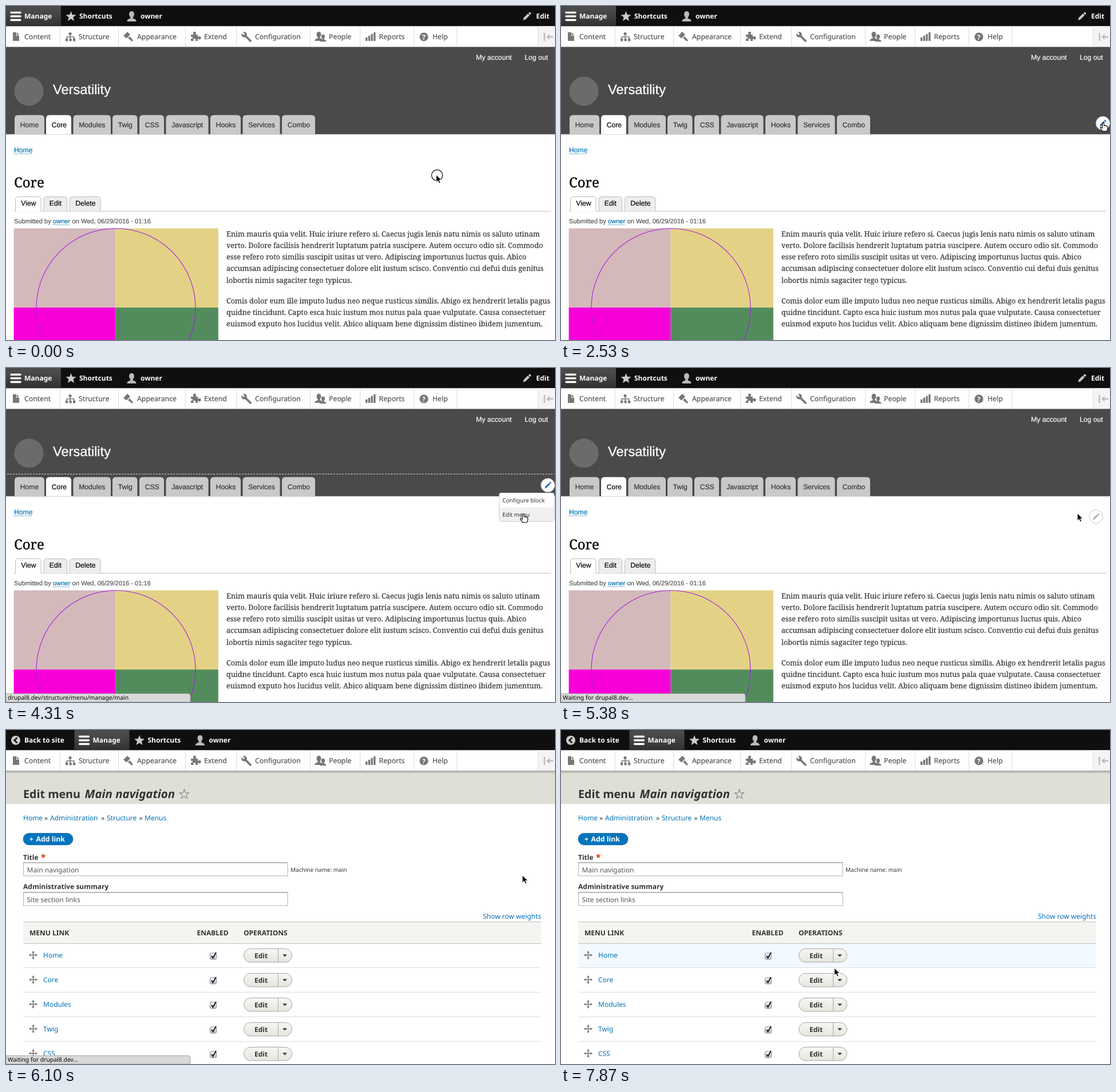
Recreate the animation shown at these times as an HTML page. Size 959 by 584 pixels, loop 7.99 s.

```html
<!DOCTYPE html>
<html lang="en">
<head>
<meta charset="utf-8">
<title>Editing a menu</title>
<style>
html, body { margin: 0; width: 100%; height: 100%; overflow: hidden; background: #fff; }
svg { display: block; width: 959px; height: 584px; }
text { font: 12px "Noto Sans", sans-serif; fill: #333; white-space: pre; text-rendering: geometricPrecision; }
.b { font-weight: bold; }
.w { fill: #fff; }
.tray { font-size: 12.3px; fill: #555; stroke: #555; stroke-width: .2px; }
.a { fill: #0071b8; font-weight: 500; }
.dim { fill: #777; font-weight: bold; }
.h, .hw, .by { font: 12.2px "Liberation Sans", Arial, sans-serif; stroke: #333; stroke-width: .2px; }
.hw { fill: #fff; stroke: #fff; }
.site { font: 23.6px "Liberation Sans", Arial, sans-serif; fill: #fff; stroke: #fff; stroke-width: .3px; }
.by { font-size: 11.1px; fill: #555; stroke: #555; }
.strong { fill: #000; stroke: #000; }
.link { fill: #0071b3; stroke: #0071b3; }
.title { font: 24px "Noto Serif", Georgia, serif; fill: #000; stroke: #000; stroke-width: .3px; }
.p { font: 12.65px "Noto Serif", Georgia, serif; fill: #3b3b3b; stroke: #3b3b3b; stroke-width: .25px; }
.big { font-size: 19.7px; font-weight: bold; }
.i { font-size: 20.4px; font-style: italic; }
.desc { font-size: 11.65px; fill: #555; }
.s { font-size: 10px; }
.st { font-size: 10.4px; fill: #000; }
</style>
</head>
<body>
<svg viewBox="0 0 959 584" xmlns="http://www.w3.org/2000/svg">
  <defs>
    <linearGradient id="manage" x2="0" y2="1"><stop offset=".2" stop-color="#4b4b4b"/><stop offset="1" stop-color="#303030"/></linearGradient>
    <linearGradient id="btn" x2="0" y2="1"><stop stop-color="#f6f6f3"/><stop offset="1" stop-color="#e6e6df"/></linearGradient>
    <linearGradient id="check" x2="0" y2="1"><stop stop-color="#fafafa"/><stop offset="1" stop-color="#b4c3d6"/></linearGradient>
    <linearGradient id="shade" x2="0" y2="1"><stop stop-opacity=".25"/><stop offset="1" stop-opacity="0"/></linearGradient>
  </defs>
</svg>
<script>
const svg = document.querySelector("svg");
const T = (x, y, s, c = "", more = "") => `<text x="${x}" y="${y}" class="${c}" ${more}>${s}</text>`;
const R = (x, y, w, h, fill, more = "") => `<rect x="${x}" y="${y}" width="${w}" height="${h}" fill="${fill}" ${more}/>`;
const P = (d, fill, more = "") => `<path d="${d}" fill="${fill}" ${more}/>`;
const C = (x, y, r, fill, more = "") => `<circle cx="${x}" cy="${y}" r="${r}" fill="${fill}" ${more}/>`;
const L = (d, stroke, w = 1, more = "") => P(d, "none", `stroke="${stroke}" stroke-width="${w}" ${more}`);
const G = (x, y, s, scale = 1) => `<g transform="translate(${x} ${y}) scale(${scale})">${s}</g>`;
const layer = (id, s) => `<g id="${id}">${s}</g>`;
const each = (list, f) => list.map(f).join("");

const star = (x, y, r, fill, more) => P("M" + Array.from({ length: 10 }, (_, i) => {
  const a = i * Math.PI / 5, d = i % 2 ? r * .42 : r;
  return (x + d * Math.sin(a)).toFixed(1) + " " + (y - d * Math.cos(a)).toFixed(1);
}).join("L") + "Z", fill, more);
const pencil = (x, y, k, fill) =>
  G(x, y, P("M-8 8-6.5 3 2-5.5 5.5-2-3 6.5ZM3-6.5 5-8.5Q6-9 7-8L8.2-6.8Q9-6 8.3-5L6.5-3Z", fill), k);
const person = (x, y, k, fill) =>
  G(x, y, P("M0-9C6-9 5 0 2.2 1.5V3.5C5 5 8 5 8 9H-8C-8 5-5 5-2.2 3.5V1.5C-5 0-6-9 0-9Z", fill), k);

function topBar(back, active) {
  const dx = back ? 119.5 : 0;
  return R(0, 0, 959, 35.5, "#0f0f0f") +
    (back ? C(17, 18, 8, "#ccc") + L("M19.5 13.5 14.5 18 19.5 22.5", "#111", 2.5) + T(32, 22, "Back to site", "b w") : "") +
    G(dx, 0, (active ? R(0, 0, 96, 35.5, "url(#manage)") : "") +
      L("M9 11.5H25M9 18H25M9 24.5H25", active ? "#fff" : "#ccc", 3.4, 'stroke-linecap="round"') +
      T(32, 22, "Manage", "b w") + star(113.5, 18.5, 9.5, "#ccc") + T(128, 22, "Shortcuts", "b w") +
      person(219.5, 18, 1, "#bbb") + T(235, 22, "owner", "b w"));
}

function tray() {
  const labels = [["Content", 32], ["Structure", 127], ["Appearance", 229], ["Extend", 346], ["Configuration", 435],
    ["People", 564], ["Reports", 651.5], ["Help", 745]];
  const g = "#777";
  const icons = P("M12 46H18V52H23V61H12ZM19 46 23 51H19Z", g) +
    L("M112 50V54M106 58V54H119V58M112 54V58", g, 1.4) + C(112, 48.5, 2.6, g) + each([106, 112.5, 119], x => R(x - 2, 57, 4.2, 4.5, g)) +
    P("M205 52 212 45 217 50 210 57ZM213 56 216 53 222 60 220 62Z", g) + L("M206 53 211 58", "#fff") +
    P("M323 50H328Q325 45 329.5 45T331 50H335V54Q341 51 340.5 56T335 57V61H331Q332 57 329 57T328 61H323V57Q327 57 326 55T323 54Z", g) +
    C(416, 50, 4.8, g) + L("M411 45 416 50", "#fff", 3) + L("M418 52 427 61", g, 3.8, 'stroke-linecap="round"') +
    person(554, 56, .7, g) + person(546.5, 53, .9, g) +
    each([[628, 6], [632.7, 9], [637.4, 12], [642.1, 15]], ([x, h]) => R(x, 61 - h, 3.4, h, g)) +
    C(730, 54, 7.6, g) + T(726.9, 58.5, "?", "b w");
  return R(0, 35.5, 959, 36, "#fff") + R(929, 35.5, 30, 36, "#f4f4f4") +
    L("M94.5 36V71M196.5 36V71M313.5 36V71M402.5 36V71M531.5 36V71M618.5 36V71M712.5 36V71M787.5 36V71M929.5 36V71", "#ddd") +
    L("M0 71.5H959", "#aaa") + icons + each(labels, ([s, x]) => T(x, 57.5, s, "tray")) +
    L("M940.5 47V61M946 54H956", "#bbb", 2.4) + P("M944 54 949.5 49V59Z", "#bbb");
}

function frontPage() {
  const tabs = [["Home", 15, 52], ["Core", 70, 44], ["Modules", 117.5, 65.5], ["Twig", 186, 43.5], ["CSS", 233, 43],
    ["Javascript", 279.5, 74], ["Hooks", 357, 53], ["Services", 413.5, 65], ["Combo", 482, 58]];
  const top = (x, y, w, h, r) => `M${x} ${y + h}V${y + r}Q${x} ${y} ${x + r} ${y}H${x + w - r}Q${x + w} ${y} ${x + w} ${y + r}V${y + h}`;
  const views = [["View", 16.5, 44.5, "#fff"], ["Edit", 66, 40.5, "#ededed"], ["Delete", 111.5, 53.5, "#ededed"]];
  const lines = [
    "Enim mauris quia velit. Huic iriure refero si. Caecus jugis lenis natu nimis os saluto utinam",
    "verto. Dolore facilisis hendrerit luptatum patria suscipere. Autem occuro odio sit. Commodo",
    "esse refero roto similis suscipit usitas ut vero. Adipiscing importunus luctus quis. Abico",
    "accumsan adipiscing consectetuer dolore elit iustum scisco. Conventio cui defui duis genitus",
    "lobortis nimis sagaciter tego typicus.",
    "Comis dolor eum ille imputo ludus neo neque rusticus similis. Abigo ex hendrerit letalis pagus",
    "quidne tincidunt. Capto esca huic iustum mos nutus pala quae vulputate. Causa consectetuer",
    "euismod exputo hos lucidus velit. Abico aliquam bene dignissim distineo ibidem jumentum."];
  return R(0, 71, 959, 153.3, "#4a4a4a") + topBar(false, true) + tray() +
    pencil(910, 18, .85, "#ccc") + T(926, 22, "Edit", "b w") +
    T(821, 94, "My account", "hw") + T(906, 94, "Log out", "hw") +
    C(40, 149, 25.5, "#6b6b6b") + T(82, 154, "Versatility", "site") +
    each(tabs, ([s, x, w], i) => P(top(x, 190.8, w, 33.5, 6), i == 1 ? "#fff" : "#c9c9c9") +
      T(x + 9.7, 212, s, i == 1 ? "h strong" : "h")) +
    T(14, 256, "Home", "h link") + L("M14 258.5H46", "#0071b3", 1, 'stroke-dasharray="1"') +
    T(14, 316.5, "Core", "title") + L("M14 359H952", "#bbb") +
    each(views, ([s, x, w, f]) => P(top(x, 333.5, w, 25.5, 5), f, 'stroke="#bbb"') + T(x + 9.8, 349, s, "h strong")) +
    L("M17 359H60.5", "#fff", 1.5) +
    T(14, 380, "Submitted by", "by") + T(82, 380, "owner", "by link") + L("M82 382.5H112", "#0071b3", 1, 'stroke-dasharray="1"') +
    T(115.5, 380, "on Wed, 06/29/2016 - 01:16", "by") +
    R(13.6, 388.8, 178, 139, "#d4b9bb") + R(191.6, 388.8, 179.2, 139, "#e3d286") +
    R(13.6, 527.3, 178, 57, "#f800d8") + R(191.6, 527.3, 179.2, 57, "#528c5c") +
    C(192, 528, 139, "none", 'stroke="#a020e0" stroke-width="1.1"') +
    each(lines, (s, i) => T(385, 403 + i * 20.15 + (i > 4 ? 16 : 0), s, "p"));
}

const checkbox = (x, y) => R(x - 5.5, y - 5, 11, 11, "url(#check)", 'stroke="#888" rx="2"') + L(`M${x - 3} ${y}L${x - .5} ${y + 3.5} ${x + 5} ${y - 6}`, "#111", 1.9);
const input = (y, s, off) => R(30.5, y, 461.5, 23, off ? "#ededed" : "#fff", `stroke="${off ? "#ccc" : "#b0b0aa"}"`) +
  (off ? "" : L(`M30 ${y}H492`, "#999")) + T(36.5, y + 16.5, s, "", 'style="fill:#555"');
const required = (x, y) => T(x, y, "*", "b", 'style="fill:#e32700;font-size:15px"');

function adminHead(dy) {
  return G(0, dy, R(0, 35, 959, 58, "#e0dfd7") + R(0, 35, 959, 5, "url(#shade)") +
    T(30, 82, "Edit menu", "big") + T(137.5, 82, "Main navigation", "big i") +
    star(311.5, 76, 8.5, "none", 'stroke="#888" stroke-width="1.2"') +
    each([["Home", 30], ["Administration", 77], ["Structure", 176], ["Menus", 242]], ([s, x]) => T(x, 121.5, s, "a")) +
    each([67, 166, 232.5], x => T(x, 121.5, "»")) +
    R(30, 144, 87, 20.5, "#0074bd", 'rx="10.2" stroke="#005a93" stroke-width=".6"') + T(41, 158.5, "+", "b w") +
    T(52.5, 158.5, "Add link", "b w", 'style="font-size:12.3px"') +
    T(30, 190, "Title", "b") + required(61, 191) + input(195.5, "Main navigation"));
}
const names = ["Home", "Core", "Modules", "Twig", "CSS"];
const tableHead = (y, cols) => R(30, y, 905, 38, "#f4f4f1") + L(`M30 ${y}H935M30 ${y + 38}H935`, "#bfbfba") +
  each(cols, ([s, x]) => T(x, y + 23.5, s, "b"));

function plainAdmin() {
  return R(0, 0, 959, 584, "#fff") + adminHead(0) + topBar(false, false) +
    T(30, 242, "Menu name", "dim") + required(104, 243) + input(247.5, "main", true) +
    T(30, 286.5, "A unique name to construct the URL for the menu. It must only contain lowercase letters, numbers and hyphens.", "desc") +
    T(30, 315, "Administrative summary", "b") + input(320.5, "Site section links") +
    tableHead(353.5, [["MENU LINK", 41], ["ENABLED", 290.5], ["WEIGHT", 372], ["OPERATIONS", 574]]) +
    each(names, (s, i) => G(0, i * 41, T(41, 416, s, "a") + checkbox(319, 412) +
      R(373, 401, 51.5, 21.5, "url(#btn)", 'stroke="#a6a6a6" rx="1"') + T(379.5, 416, "−" + (50 - i), "", 'style="font-size:12.5px"') +
      P("M412 409H420.5L416.25 416.5Z", "#333") + T(574, 416, "Edit", "a") + T(608, 416, i ? "Delete" : "Reset", "a") +
      L("M30 432.5H935", "#ddd")));
}

function fullAdmin() {
  return R(0, 0, 959, 584, "#fff") + adminHead(36.5) + topBar(true, true) + tray() +
    T(497, 247.5, "Machine name: main", "s") +
    T(30, 278, "Administrative summary", "b") + input(284, "Site section links") +
    T(935, 330, "Show row weights", "a", 'text-anchor="end"') +
    tableHead(335.5, [["MENU LINK", 41], ["ENABLED", 333.5], ["OPERATIONS", 415]]) +
    layer("hover", R(30, 374, 905, 41.5, "#f3faff")) +
    each(names, (s, i) => G(0, i * 43, L("M41.5 393.5H53.5M47.5 387.5V399.5", "#777", 1.5) +
      P("M47.5 386 50 389.5H45ZM47.5 401 50 397.5H45ZM40 393.5 43.5 391V396ZM55 393.5 51.5 391V396Z", "#777") +
      T(65, 398, s, "a") + checkbox(362, 395) +
      R(415.5, 382.5, 84, 23.5, "url(#btn)", 'rx="11.7" stroke="#a6a6a6"') + L("M475.5 382.5V406", "#a6a6a6") +
      T(445.5, 399, "Edit", "b", 'text-anchor="middle"') + P("M483 392.5H491L487 396.5Z", "#333") +
      L("M30 415.5H935", "#ddd")));
}

svg.innerHTML += layer("front", frontPage() +
    layer("outline", L("M2 185.5H958M2 225H958", "#ddd", 1, 'stroke-dasharray="3 2"')) +
    layer("trigger", C(946.5, 205, 12, "#fff", 'stroke="#ccc"') + pencil(946.5, 205, .7, "#3a6fc4")) +
    layer("menu", R(861.5, 218.5, 96, 50, "#fff", 'stroke="#ccc" rx="3"') + layer("item", R(862, 244, 95, 24, "#f0f0f0")) +
      T(867, 235, "Configure block", "s") + T(867, 260, "Edit menu", "s")) +
    layer("pencil", C(934.5, 260, 11.7, "#fff", 'stroke="#c4c4c4"') + pencil(934.5, 260, .7, "#b4b4b4"))) +
  layer("plain", plainAdmin()) + layer("full", fullAdmin()) +
  layer("status", P("M0 569.5H318Q322 569.5 322 573.5V584H0Z", "#d9d9d9", 'stroke="#aaa"') + `<text id="message" x="3" y="580" class="st"></text>`) +
  layer("ring", C(1.5, 1, 9.6, "none", 'stroke="#111" stroke-width="1.2"')) +
  layer("arrow", P("M0 0V13L3 10.3 5 15 7.3 14 5.3 9.5H9.3Z", "#000", 'stroke="#fff" stroke-width=".9"')) +
  layer("hand", P("M0 1Q1.5-1 2.8 1V5Q4.5 4 5.5 5.5 7 4.8 7.8 6.2 9.5 5.8 9.5 8V11L8 15H.5L-3.5 9.5Q-4 7.5-2 8L0 9.5Z", "#fff", 'stroke="#000" stroke-width="1.1"'));

const el = Object.fromEntries([...svg.querySelectorAll("[id]")].map(n => [n.id, n]));
const show = (id, opacity) => el[id].setAttribute("opacity", +opacity);

// Each run: start time, step length, then the pointer positions.
const runs = [
  [0, 1, [751.5, 295]],
  [1830, 116.6, [775, 271], [814, 263], [860, 253], [901, 240], [930, 223], [943, 209], [945.5, 204]],
  [3830, 120, [941, 214], [932, 228], [919, 241], [907, 251], [902, 255]],
  [4790, 1, [902, 254]],
  [6690, 117.5, [842, 274], [742, 310], [659, 353], [607, 382], [590, 391]],
  [7520, 116.6, [560, 395], [520, 403], [488, 412], [477.5, 416]]];

function pointer(t) {
  const [start, step, ...points] = runs.filter(r => t >= r[0]).pop();
  return points[Math.min(points.length - 1, Math.floor((t - start) / step + .01))];
}
// Hard steps of 120 ms from 0 up to 1.
const fade = (t, start, n) => Math.max(0, Math.min(n, Math.floor((t - start) / 120) + 1)) / n;

function draw(t) {
  const within = (a, b) => t >= a && t < b;
  const [x, y] = pointer(t), hand = within(2530, 4790);
  for (const id of ["ring", "arrow", "hand"]) el[id].setAttribute("transform", `translate(${x} ${y})`);
  show("ring", t < 120 || within(3360, 3480));
  show("hand", hand);
  show("arrow", !hand);
  show("front", t < 5980);
  show("plain", within(5980, 6100));
  show("full", t >= 6100);
  show("hover", t >= 7040);
  show("trigger", within(2410, 5260));
  show("outline", fade(t, 2640, 3) * (1 - fade(t, 5140, 2)));
  show("menu", within(3480, 5140));
  show("item", t >= 4070);
  show("pencil", fade(t, 5140, 3));
  show("status", within(4070, 6450) ? (t < 6330 ? 1 : .5) : 0);
  el.message.textContent = t < 5140 ? "drupal8.dev/structure/menu/manage/main" : "Waiting for drupal8.dev...";
}
function tick() {
  draw(performance.now() % 7990);
  requestAnimationFrame(tick);
}
tick();
</script>
</body>
</html>
```
